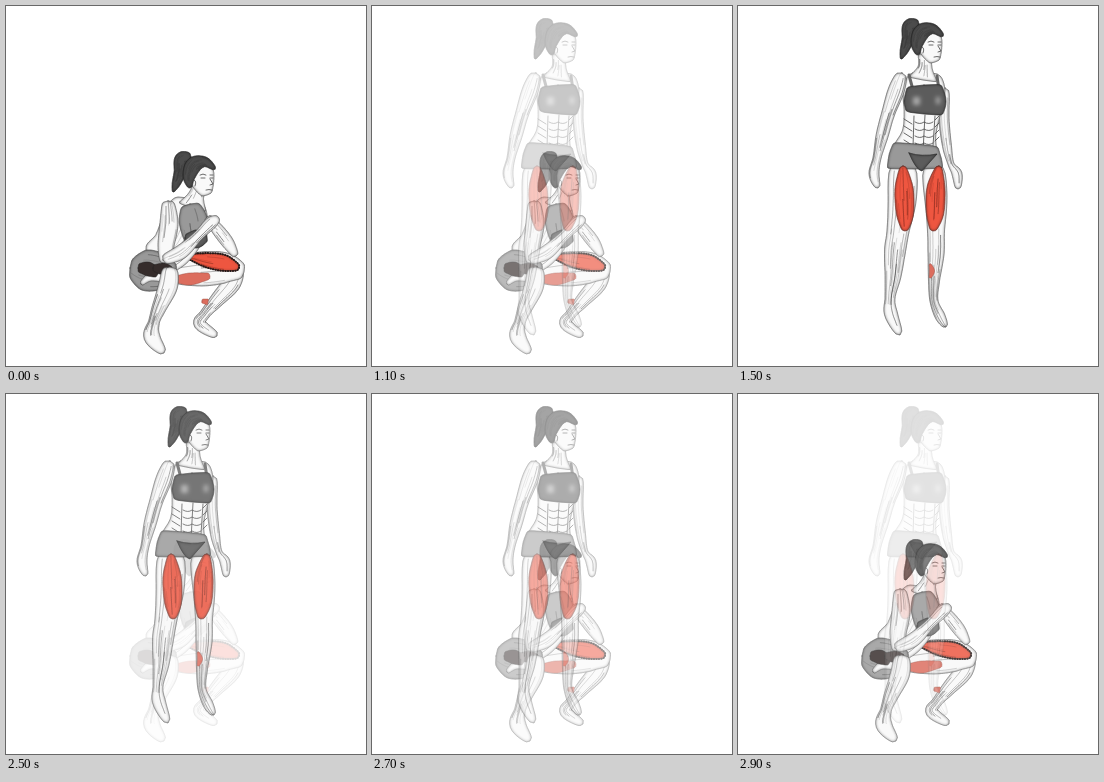
These frames come from a looping animation (360x360 px, 3000 ms). An HTML page:

```html
<!DOCTYPE html>
<html lang="en">
<head>
<meta charset="utf-8">
<title>Squat to calf raise</title>
<style>
  html, body { margin: 0; width: 100%; height: 100%; overflow: hidden; background: #fff; }
  svg { display: block; width: 100vw; height: 100vh; }
  path { stroke-width: .5; stroke-linecap: round; stroke-linejoin: round; }
  .skin, .cloth, .sheer, .hair, .red { filter: url(#round); }
  .skin { fill: #f9f9f9; stroke: #666; }
  .cloth { fill: #5c5c5c; stroke: #333; }
  .sheer { fill: #999; stroke: #555; }
  .hair { fill: #4c4c4c; stroke: #222; }
  .red { fill: #ee5640; stroke: #7c2a20; }
  .pink { fill: #dc6d5e; stroke: #9c5047; }
  .dark { fill: #352c2b; stroke: #222; }
  .strand { fill: none; stroke: #333; }
  .red + .strand, .red + .strand ~ .strand { stroke: #5a1c14; }
  .ink { fill: none; stroke: #444; stroke-width: .8; }
  .strap { fill: none; stroke: #666; stroke-width: 3; }
  .glow { fill: #aaa; filter: url(#soft); }
  .dots { fill: none; stroke: #251918; stroke-width: 2; stroke-dasharray: .4 2.1; }
</style>
</head>
<body>
<svg viewBox="0 0 360 360">
  <defs>
    <filter id="round" x="-20%" y="-20%" width="140%" height="140%" color-interpolation-filters="sRGB">
      <feGaussianBlur in="SourceAlpha" stdDeviation="1.8" result="blur"/>
      <feFlood flood-color="#111" flood-opacity=".75"/>
      <feComposite in2="blur" operator="out"/>
      <feComposite in2="SourceAlpha" operator="in" result="edge"/>
      <feMerge><feMergeNode in="SourceGraphic"/><feMergeNode in="edge"/></feMerge>
    </filter>
    <filter id="soft" x="-60%" y="-60%" width="220%" height="220%"><feGaussianBlur stdDeviation="2"/></filter>
  </defs>
  <g id="squat"></g>
  <g id="stand"></g>
</svg>
<script>
let seed = 7;
const random = () => (seed = seed * 16807 % 2147483647) / 2147483647;

// Smooth spine through [x, y, radius] joints, t from 0 to 1
function spine(joints, t) {
  const u = t * (joints.length - 1);
  const i = Math.min(Math.floor(u), joints.length - 2);
  const s = u - i;
  const joint = k => joints[Math.max(0, Math.min(joints.length - 1, k))];
  const [a, b, c, d] = [-1, 0, 1, 2].map(k => joint(i + k));
  return b.map((v, k) => v + s / 2 * (c[k] - a[k]
    + s * (2 * a[k] - 5 * v + 4 * c[k] - d[k] + s * (3 * (v - c[k]) + d[k] - a[k]))));
}

// Points running beside the spine, "side" radii away from it
function rail(joints, side, from = 0, to = 1) {
  return Array.from({ length: 41 }, (_, i) => {
    const t = from + (to - from) * i / 40;
    const [x, y, r] = spine(joints, t);
    const [x0, y0] = spine(joints, Math.max(0, t - .01));
    const [x1, y1] = spine(joints, Math.min(1, t + .01));
    const offset = side * r * Math.sqrt(1 - (1 - 2 * t) ** 16) / Math.hypot(x1 - x0, y1 - y0);
    return [(x - (y1 - y0) * offset).toFixed(1), (y + (x1 - x0) * offset).toFixed(1)];
  });
}

const path = (type, d, style = '') => `<path class="${type}" d="${d}" style="${style}"/>`;
const outline = joints => 'M' + rail(joints, 1).concat(rail(joints, -1).reverse()).join('L') + 'Z';

// A tapered body part with muscle strands or hair along it
function limb(type, joints, strands = 0) {
  let svg = path(type, outline(joints));
  for (let i = 0; i < strands; i++) {
    const side = ((i + random()) / strands * 2 - 1) * .85;
    const from = random() * .55;
    const line = 'M' + rail(joints, side, from, from + .2 + random() * .25).join('L');
    svg += path('strand', line, `stroke-width:${.3 + random() * .7};opacity:${.3 + random() * .4}`);
  }
  return `<g>${svg}</g>`;
}

const head =
  limb('skin', [[189, 24, 11], [191, 36, 13], [194, 47, 10], [197, 56, 5]]) +
  limb('hair', [[181, 18, 4], [172, 20, 7], [170, 33, 6], [166, 45, 4], [163, 53, 1]], 9) +
  limb('hair', [[205, 30, 2], [195, 23, 5], [184, 26, 8], [179, 38, 6], [180, 49, 2]], 9) +
  path('ink', 'M190 36q3-2 6 0M200 36l3 0M191 39h4M200 39h3M200 40l3 5-3 1M196 51q3-1 6 0M184 41q3 1 1 6');

// Ribs and abdominal blocks
let abs = path('ink', 'M187 109L185 146M176 110L175 141M197 110L195 140');
for (let y = 113; y < 138; y += 7) {
  abs += path('ink', `M177 ${y + 3}q5 3 9 0q5 3 9 0M166 ${y}l8 5M201 ${y - 3}l-4 4`);
}

const standing =
  limb('skin', [[207, 82, 5], [206, 112, 5], [209, 140, 4.5], [213, 158, 3], [219, 168, 5], [220, 183, 3]], 6) +
  limb('skin', [[195, 158, 13], [198, 195, 11], [198, 225, 8.5], [198, 248, 8], [196, 275, 5.5], [196, 295, 4], [202, 310, 5], [208, 321, 3]], 12) +
  limb('skin', [[165, 156, 16], [164, 195, 14], [160, 225, 11], [157, 245, 10.5], [155, 270, 8], [152, 292, 5], [153, 308, 6.5], [162, 329, 4]], 14) +
  limb('skin', [[187, 66, 16], [186, 85, 21], [184, 108, 18], [181, 128, 17], [177, 148, 24], [177, 160, 27]]) +
  limb('skin', [[187, 48, 7], [187, 61, 7], [185, 74, 15]], 6) + abs +
  limb('sheer', [[178, 138, 22], [177, 150, 26], [177, 163, 28]]) +
  path('cloth', 'M171 147Q184 151 199 148L184 165Q178 164 171 147Z') +
  path('strap', 'M171 69L175 84M199 70L201 84') +
  limb('cloth', [[186, 79, 17], [187, 95, 21], [186, 108, 18]]) +
  path('glow', 'M175 91h7v8h-7zM198 91h4v7h-4z') +
  limb('skin', [[164, 67, 6], [158, 85, 8], [150, 108, 6.5], [144, 130, 6], [139, 152, 4], [136, 168, 5], [140, 182, 3]], 12) +
  limb('red', [[165, 160, 3], [166, 182, 9], [167, 208, 8.5], [167, 225, 3]], 9) +
  limb('red', [[201, 160, 3], [198, 182, 9], [197, 208, 8.5], [195, 225, 3]], 9) +
  limb('pink', [[192, 258, 1], [194, 265, 2.5], [192, 272, 1]]) + head;

const topQuad = [[181, 250, 2], [200, 254, 7], [218, 257, 8], [233, 262, 3]];

const squatting =
  limb('skin', [[231, 263, 8], [225, 278, 9], [211, 294, 7], [199, 308, 5], [194, 318, 6], [211, 330, 4]], 10) +
  limb('skin', [[166, 266, 12], [195, 263, 17], [220, 262, 15], [238, 266, 7]], 7) +
  limb('red', topQuad, 5) + path('dots', outline(topQuad)) +
  limb('pink', [[169, 273, 3], [184, 273, 6], [204, 270, 3]]) +
  limb('pink', [[196, 295, 2], [202, 296, 3]]) +
  limb('skin', [[183, 192, 14], [180, 208, 22], [176, 225, 23], [165, 243, 21], [146, 256, 18]], 10) +
  limb('skin', [[194, 180, 7], [190, 190, 8], [186, 202, 15]], 6) +
  limb('sheer', [[184, 198, 9], [187, 213, 14], [189, 230, 12], [190, 241, 7]], 4) +
  limb('cloth', [[179, 232, 4], [190, 233, 9], [201, 231, 4]]) +
  limb('skin', [[201, 211, 4], [212, 224, 6], [222, 237, 6], [230, 250, 3]], 5) +
  limb('sheer', [[124, 262, 9], [138, 264, 20], [156, 266, 18], [170, 268, 9]], 7) +
  limb('skin', [[135, 278, 2], [145, 271, 4], [163, 272, 5]]) +
  limb('dark', [[132, 262, 4], [142, 263, 7], [152, 268, 4]]) +
  limb('dark', [[147, 262, 3], [158, 263, 6], [166, 264, 3]]) +
  limb('skin', [[164, 261, 8], [162, 280, 9.5], [153, 302, 7], [148, 316, 5.5], [146, 331, 8], [158, 347, 4]], 12) +
  limb('skin', [[162, 195, 6], [163, 217, 9], [160, 240, 8], [160, 257, 6]], 8) +
  limb('skin', [[157, 254, 5], [175, 246, 7], [192, 230, 5], [205, 217, 6], [213, 212, 3]], 8) +
  `<g transform="translate(4 133)">${head}</g>`;

const squat = document.getElementById('squat');
const stand = document.getElementById('stand');
squat.innerHTML = squatting;
stand.innerHTML = standing;

// Cross-fade in sixths, one step every 100 ms
function standOpacity(ms) {
  const steps = from => Math.max(0, Math.min(6, Math.floor((ms - from) / 100) + 1));
  return (steps(1000) - steps(2500)) / 6;
}

function frame() {
  const opacity = standOpacity(performance.now() % 3000);
  stand.setAttribute('opacity', opacity);
  squat.setAttribute('opacity', 1 - opacity);
  requestAnimationFrame(frame);
}
frame();
</script>
</body>
</html>
```
